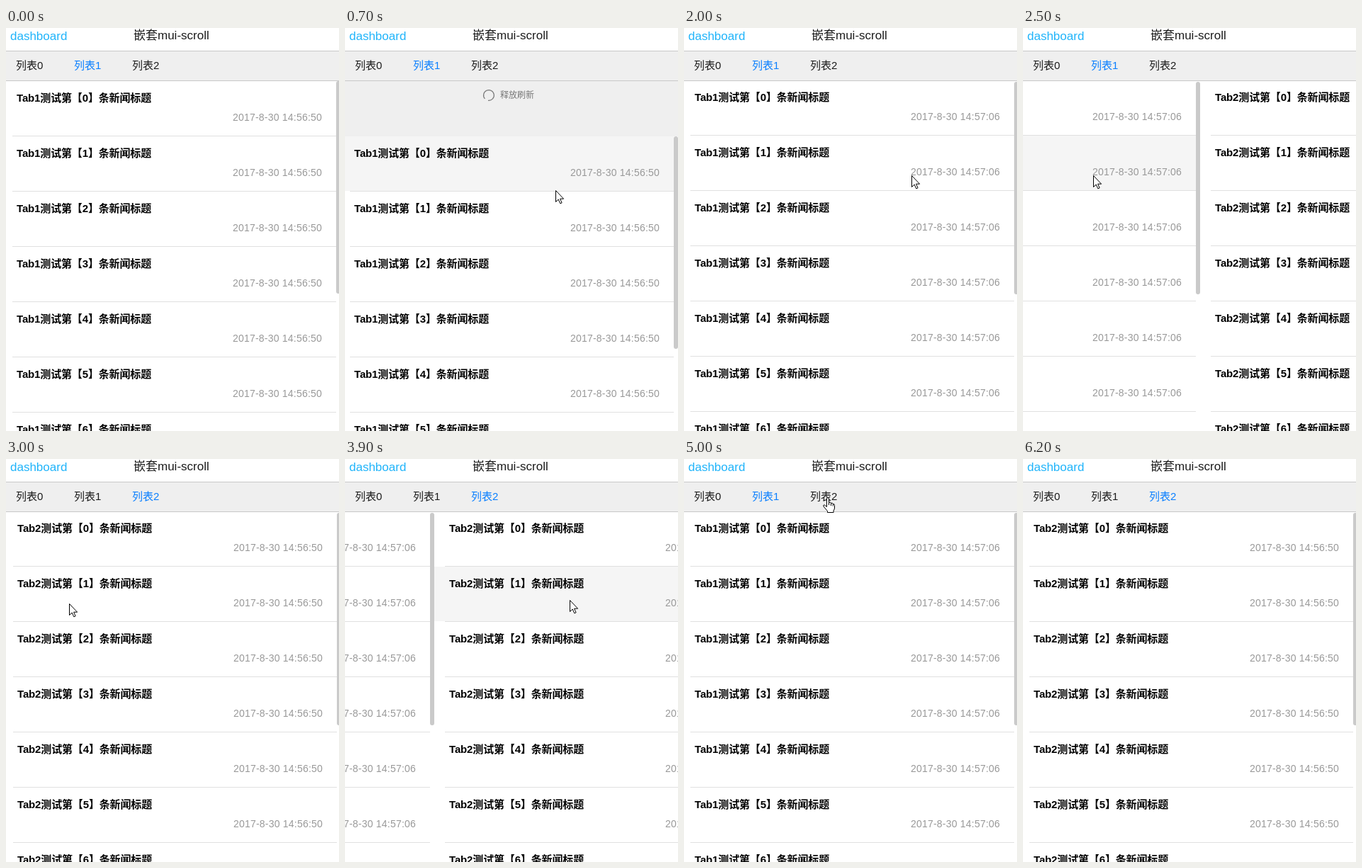
An HTML page for the animation above (6.5 s loop, 470 by 569 pixels).

```html
<!DOCTYPE html>
<html lang="zh-CN">
<head>
<meta charset="utf-8">
<style>
  html, body { margin: 0; width: 100%; height: 100%; overflow: hidden; }
  body { position: relative; background: #fff; color: #1c1c1c;
    font-family: "Liberation Sans", "Noto Sans CJK SC", sans-serif; }
  body *, svg { position: absolute; white-space: nowrap; }
  #bar { left: 0; top: 0; width: 470px; height: 32px; background: #fff; font-size: 17px; line-height: 22px; }
  #back { left: 6px; top: 1px; color: #1fb4fa; }
  #name { left: 180px; }
  #tabs { left: 0; top: 32px; width: 470px; height: 41px; background: #efefef;
    border: solid #c8c8c8; border-width: 1px 0; font-size: 15px; line-height: 39px; }
  #tabs .on { color: #0a7fff; }
  #view { left: 0; top: 75px; width: 470px; height: 494px; overflow: hidden; background: #fff; }
  #pull { left: 0; top: 0; width: 470px; height: 494px; background: #efefef; }
  #tip { left: 219px; top: 10px; font-size: 12px; line-height: 20px; color: #777; }
  #ring { left: 194px; top: 11px; width: 18px; height: 18px; fill: none; stroke: #777; stroke-width: 1.2; }
  .busy #tip { left: 222px; }
  .busy #ring { left: 198px; stroke: #a0a0a0; stroke-width: 2; }
  .page { left: 0; top: 0; width: 478px; height: 494px; }
  .list { left: 0; top: 0; width: 478px; height: 860px; background: #fff; }
  .row { left: -6px; width: 472px; height: 77px; }
  .row.on { background: #f5f5f5; }
  .row b { left: 21px; top: 14px; font-size: 15px; line-height: 20px; letter-spacing: -.15px; color: #000; }
  .row time { right: 20px; top: 41px; font-size: 14px; line-height: 20px; letter-spacing: .21px; color: #999; }
  .row i { left: 15px; right: 0; top: 77px; height: 1px; background: #e0e0e0; }
  .thumb { left: 466px; top: 0; width: 6px; height: 300px; border-radius: 3px; background: #cacaca; }
  .cursor { left: 0; top: 0; overflow: visible; fill: #fff; stroke: #000; }
</style>
</head>
<body>
<div id="view">
  <div id="pull">
    <svg id="ring" viewBox="-9 -9 18 18"><path d="M-5.6 4.9A7.4 7.4 0 1 1 -1 7.35"/></svg>
    <span id="tip"></span>
  </div>
</div>
<div id="tabs"></div>
<div id="bar"><span id="back">dashboard</span><span id="name">嵌套mui-scroll</span></div>
<svg class="cursor" id="arrow" width="13" height="20"><path d="M.5 .5V16.5L4.2 13L6.8 18.8L9.1 17.8L6.6 12.2H11.6Z"/></svg>
<svg class="cursor" id="hand" width="18" height="23"><path d="M5.5 13.5V2Q5.5 .5 7 .5T8.5 2V7.5Q11 6 11.5 8.5Q13.5 7.3 14.2 9.5Q16.5 9 16.5 11.5V15Q16.5 17 15 19V21.5H6.5V19.5L1 13Q0 10.5 2.5 11Z"/><path d="M8.5 7.5V11M11.5 8.5V12M14.3 9.5V12.5" fill="none"/></svg>
<script>
const LOOP = 6500, STEP = 100, PAGE = 478, ROW = 78, ROWS = 7;
const LOADING = 75, LOADED = 1800, TAP = 5200, SETTLE = 500, SWITCH = 200;
const $ = id => document.getElementById(id);

// Each gesture moves the pointer by (dx, dy) from (x, y)
const gesture = (start, end, x, y, dx = 0, dy = 0) => ({ start, end, x, y, dx, dy });
const pull = gesture(290, 1300, 299, 151, -6, 193);
const swipeLeft = gesture(2200, 2600, 321, 208, -296);
const swipeRight = gesture(3600, 4100, 185, 199, 220);
const gestures = [
  pull,
  gesture(1600, 1700, 310, 344),
  gesture(2000, 2200, 321, 208),
  swipeLeft,
  swipeRight,
  gesture(5000, 5600, 202, 55),
  gesture(6200, LOOP, 40, 560),
];

const mix = (a, b, p) => a + (b - a) * p;
const ramp = (t, a, b) => Math.min(1, Math.max(0, (t - a) / (b - a || 1)));
const easeOut = p => 1 - (1 - p) ** 3;
const within = (t, a, b) => t >= a && t < b;
const held = (g, t) => within(t, g.start, g.end);

// Follows the drag, then settles on the goal after release
function follow(g, axis, t, goal, settle = SETTLE) {
  const dragged = g[axis] * ramp(t, g.start, g.end);
  return mix(dragged, goal, easeOut(ramp(t, g.end, g.end + settle)));
}

function pointerAt(t) {
  let x = 322, y = 260, left = 100;
  for (const g of gestures) {
    const go = ramp(t, left, g.start), drag = ramp(t, g.start, g.end);
    x = mix(x, g.x, go) + g.dx * drag;
    y = mix(y, g.y, go) + g.dy * drag;
    left = g.end;
  }
  return [x, y];
}

function slideAt(t) {
  if (t >= TAP) return -PAGE;
  return follow(pull, "dx", t, 0, 300)
    + follow(swipeLeft, "dx", t, -PAGE)
    + follow(swipeRight, "dx", t, PAGE);
}

const scrollAt = t => mix(follow(pull, "dy", t, LOADING, 300), -1, easeOut(ramp(t, LOADED, LOADED + 200)));

function add(parent, tag, cls = "", text = "") {
  const el = document.createElement(tag);
  el.className = cls;
  el.textContent = text;
  return parent.appendChild(el);
}

const tabs = [0, 1, 2].map(i => {
  const el = add($("tabs"), "span", "", "列表" + i);
  el.style.left = 14 + i * 82 + "px";
  return el;
});

const pages = [1, 2].map(n => {
  const box = add($("view"), "div", "page");
  const list = add(box, "div", "list");
  const rows = Array.from({ length: ROWS }, (_, i) => {
    const row = add(list, "div", "row");
    row.style.top = i * ROW + "px";
    add(row, "b", "", `Tab${n}测试第【${i}】条新闻标题`);
    add(row, "i");
    return { row, date: add(row, "time", "", "2017-8-30 14:56:50") };
  });
  return { box, list, rows, thumb: add(box, "div", "thumb") };
});

const move = (el, x, y) => el.style.transform = `translate(${Math.round(x)}px,${Math.round(y)}px)`;
const show = (el, on) => el.style.visibility = on ? "visible" : "hidden";
const press = (page, row, on) => pages[page].rows[row].row.classList.toggle("on", on);

function drawPull(t, y) {
  const busy = t >= pull.end + 100;
  show($("pull"), y > 0);
  $("pull").classList.toggle("busy", busy);
  $("tip").textContent = busy ? "加载中..." : y < 60 ? "下拉刷新" : "释放刷新";
  const turn = busy ? t * .36 + 69 : Math.min(0, y - 60) * 3;
  $("ring").style.transform = `rotate(${turn}deg)`;
}

function drawPointer(t) {
  const [x, y] = pointerAt(t);
  const visible = within(t, 100, 6200), onTabs = y < 75;
  move($("arrow"), x, y);
  move($("hand"), x - 6, y - 1);
  show($("arrow"), visible && !onTabs);
  show($("hand"), visible && onTabs);
}

function draw(t) {
  const x = slideAt(t), y = scrollAt(t);
  pages.forEach((p, i) => {
    const top = i ? -1 : y;
    move(p.box, x + i * PAGE, 0);
    move(p.list, 0, top);
    move(p.thumb, 0, Math.abs(top));
  });

  const stamp = "2017-8-30 " + (t < LOADED ? "14:56:50" : "14:57:06");
  pages[0].rows.forEach(r => r.date.textContent = stamp);
  press(0, 0, held(pull, t));
  press(0, 1, held(swipeLeft, t));
  press(1, 1, held(swipeRight, t));

  const second = within(t, swipeLeft.end + SWITCH, swipeRight.end + SWITCH) || t >= TAP;
  tabs.forEach((el, i) => el.classList.toggle("on", i === (second ? 2 : 1)));
  drawPull(t, y);
  drawPointer(t);
}

const start = performance.now();
function tick() {
  const t = (performance.now() - start) % LOOP;
  draw(Math.floor(t / STEP) * STEP);
  requestAnimationFrame(tick);
}
tick();
</script>
</body>
</html>
```
